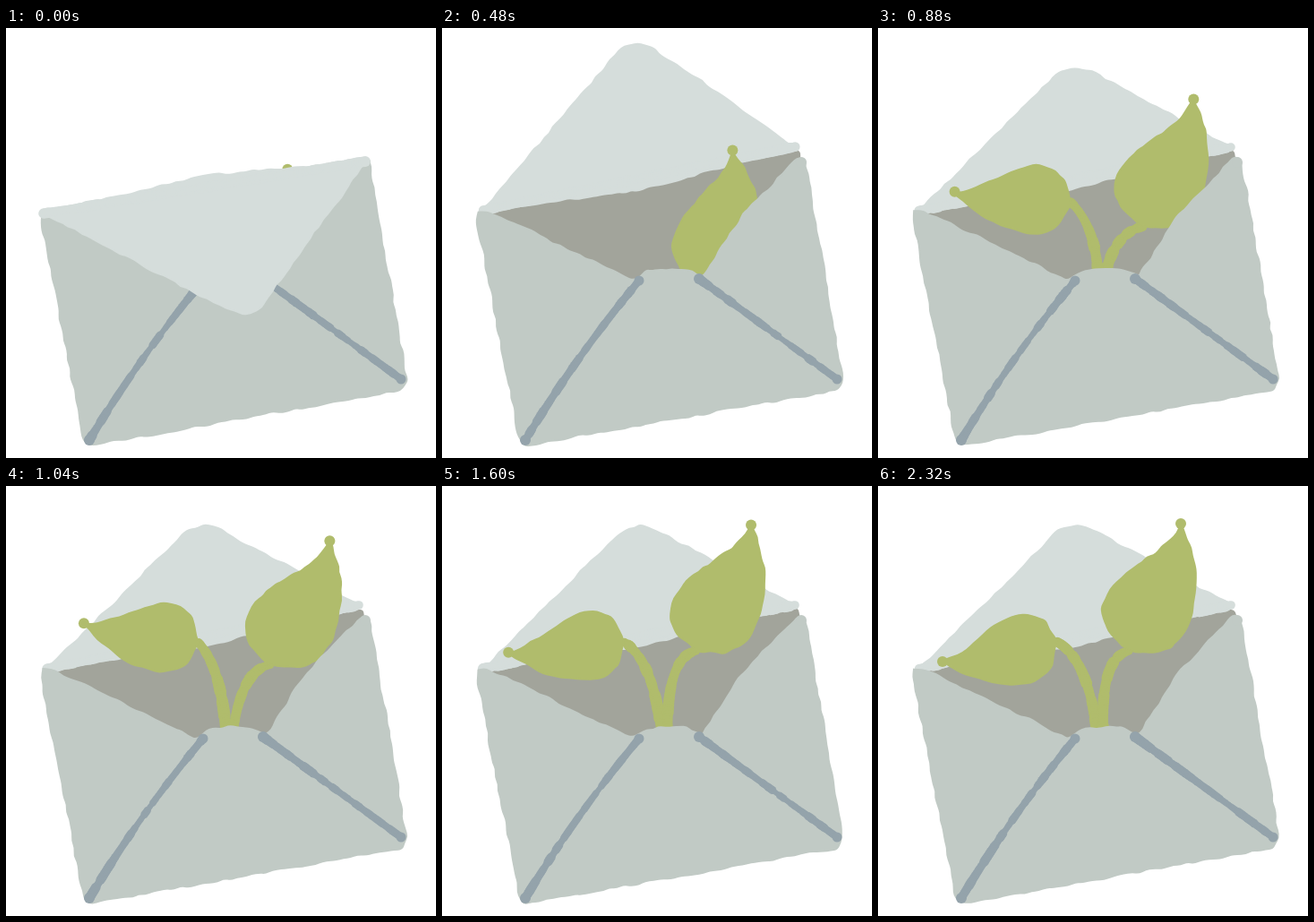
Animation, 480 px wide and 480 px high, one loop 2400 ms. Source, as an HTML page with a canvas:

```html
<!DOCTYPE html>
<html lang="en">
<head>
<meta charset="utf-8">
<title>Sprouting envelope</title>
<style>
  html, body { margin: 0; width: 100%; height: 100%; overflow: hidden; background: #fff; }
  canvas { display: block; width: 480px; height: 480px; }
</style>
</head>
<body>
<canvas id="stage" width="480" height="480"></canvas>
<script>
const ctx = document.getElementById('stage').getContext('2d');
const LOOP = 2400, STEP = 80;
const PAPER = '#c1cac5', FLAP = '#d5dddb', INSIDE = '#a2a49b', GREEN = '#b0bc6c', SEAM = '#94a3ab';

const POCKET = [[41, 205], [50, 204], [212, 282], [228, 272], [250, 269], [272, 270], [291, 278],
  [336, 208], [398, 145], [405, 147], [447, 392], [441, 404], [93, 466], [87, 460], [39, 213]];

const mix = (a, b, k) => a + (b - a) * k;
const middle = (a, b) => [mix(a[0], b[0], 0.5), mix(a[1], b[1], 0.5)];
const progress = (time, from, to) => Math.min(1, Math.max(0, (time - from) / (to - from)));
const ease = k => (1 - Math.cos(Math.PI * k)) / 2;

let seed = 1;
function wobble(amount) {
  seed = (seed * 16807) % 2147483647;
  return (seed / 2147483647 * 2 - 1) * amount;
}

// Fills a polygon with an uneven, hand-cut edge
function cutout(points, color) {
  const edge = [];
  points.forEach(([x, y], i) => {
    const [nx, ny] = points[(i + 1) % points.length];
    const count = Math.max(1, Math.round(Math.hypot(nx - x, ny - y) / 8));
    for (let j = 0; j < count; j++) {
      edge.push([mix(x, nx, j / count) + wobble(1.5), mix(y, ny, j / count) + wobble(1.5)]);
    }
  });
  ctx.beginPath();
  edge.forEach((point, i) => {
    ctx.quadraticCurveTo(...point, ...middle(point, edge[(i + 1) % edge.length]));
  });
  ctx.closePath();
  ctx.fillStyle = ctx.strokeStyle = color;
  ctx.lineWidth = 2;
  ctx.fill();
  ctx.stroke();
}

function dot([x, y], radius, color) {
  ctx.beginPath();
  ctx.arc(x, y, radius, 0, 7);
  ctx.fillStyle = color;
  ctx.fill();
}

// Lumpy brush stroke along a quadratic curve; radius is a function of progress
function brush(a, bend, b, radius, color) {
  const count = Math.ceil(Math.hypot(b[0] - a[0], b[1] - a[1]) / 2);
  let lump = 0;
  for (let i = 0; i <= count; i++) {
    const k = i / count;
    if (i % 4 === 0) lump = wobble(0.8);
    const at = n => mix(mix(a[n], bend[n], k), mix(bend[n], b[n], k), k);
    dot([at(0), at(1)], radius(k) + lump, color);
  }
}

// A leaf grows from base to tip; curl bends its centre line sideways
function drawLeaf({ base, tip, width, curl, bend, root }, dx, dy, degrees) {
  const turn = degrees * Math.PI / 180;
  const place = (x, y) => [
    base[0] + dx + x * Math.cos(turn) - y * Math.sin(turn),
    base[1] + dy + x * Math.sin(turn) + y * Math.cos(turn)];
  const axis = [tip[0] - base[0], tip[1] - base[1]];
  const length = Math.hypot(...axis);
  const side = [-axis[1] / length, axis[0] / length];

  brush(place(0, 0), place(bend[0] - base[0], bend[1] - base[1]), root, k => 5 + k * 1.5, GREEN);
  const outline = [];
  for (let i = -14; i <= 14; i++) {
    const u = 1 - Math.abs(i) / 14;
    const out = Math.sign(i) * width * Math.sin(Math.PI * u ** 0.576)
      + curl * Math.sin(Math.PI * u ** 2.5);
    outline.push(place(axis[0] * u + side[0] * out, axis[1] * u + side[1] * out));
  }
  // The sweep passes the stem end first, so the loop is closed tip to base to tip
  cutout(outline.map((_, i) => outline[(i + 14) % 29]), GREEN);
  dot(place(...axis), 6, GREEN);
}

function drawPlant(time) {
  const relax = (1 - progress(time, 1040, 1840)) ** 1.2;
  const leftSink = 1 - ease(progress(time, 200, 1080));
  const rightSink = 1 - ease(progress(time, 160, 1300));
  drawLeaf({ base: [200, 174], tip: [72, 196], width: 38, curl: -6, bend: [236, 194], root: [246, 285] },
    15 * relax, 165 * leftSink, 19.5 * relax - 39 * leftSink);
  drawLeaf({ base: [280, 184], tip: [338, 42], width: 48, curl: 10, bend: [246, 192], root: [252, 285] },
    15 * relax, 126 * rightSink, 6 * relax - 21 * rightSink);
}

// Swings past its resting height, then settles
function flapAt(time) {
  const open = ease(progress(time, 0, 520) ** 1.4);
  const settle = ease(progress(time, 540, 700));
  const lift = 9 * Math.sin(Math.PI * open);
  const left = [mix(42, 46, open), mix(207, 204, open) - lift];
  const right = [mix(401, 394, open), mix(149, 133, open) - lift];
  const x = mix(265, 217, open) + 5 * settle;
  const height = mix(-149, 160, open) - 36 * settle;
  const hingeY = mix(left[1], right[1], (x - left[0]) / (right[0] - left[0]));
  return { left, right, tip: [x, hingeY - height], lean: -height / 150 };
}

function drawFlap({ left, right, tip: [x, y], lean }) {
  const [cx, cy] = middle(left, right);
  cutout([left, [x - 20, y - lean * 7], [x, y], [x + 18, y - lean * 6], right,
    [cx, cy - lean * 13]], FLAP);
  brush(left, [cx, cy], right, () => 5.5, FLAP);
}

function drawSeam(from, bend, to) {
  brush(from, bend, to, k => 3.4 + 2 * Math.abs(k - 0.6) ** 0.7, SEAM);
  dot(from, 6, SEAM);
  dot(to, 5.5, SEAM);
}

function draw(time) {
  seed = 7919 * (time / STEP + 1);
  ctx.fillStyle = '#fff';
  ctx.fillRect(0, 0, 480, 480);
  const flap = flapAt(time);
  const flapBehind = flap.lean < -0.1;

  cutout([[46, flap.left[1] + 2], [398, flap.right[1] + 5], [399, 150], [300, 290], [210, 290]], INSIDE);
  if (flapBehind) drawFlap(flap);
  drawPlant(time);
  cutout(POCKET, PAPER);
  dot([401, 150], 6, PAPER);
  drawSeam([93, 460], [150, 366], [220, 282]);
  drawSeam([287, 280], [364, 336], [441, 392]);
  if (!flapBehind) drawFlap(flap);
}

// Drawn on a fixed step, with two held poses near the end
function frame() {
  let step = Math.floor(performance.now() % LOOP / STEP);
  if (step === 24 || step === 25) step = 23;
  if (step === 28) step = 27;
  draw(step * STEP);
  requestAnimationFrame(frame);
}
frame();
</script>
</body>
</html>
```
